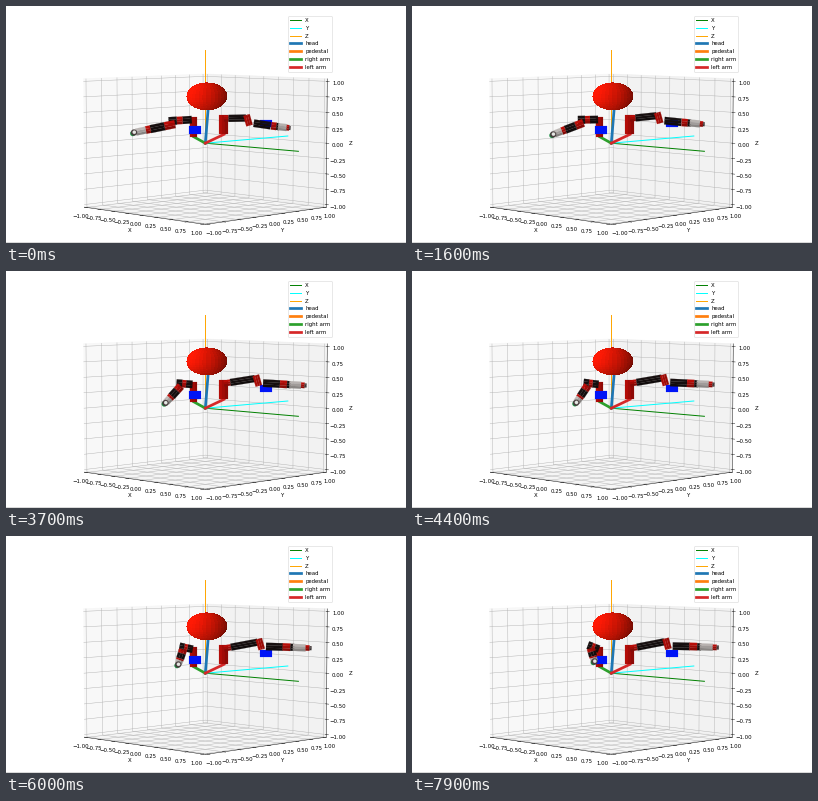
Animation of 400x237 px, one loop 8000 ms. Source, as a matplotlib script:

```python
import numpy as np
import matplotlib.pyplot as plt
from matplotlib.animation import FuncAnimation
from matplotlib.collections import PolyCollection
from matplotlib.patches import Rectangle

W, H, DPI = 400, 237, 39.2
FRAMES, INTERVAL = 80, 100

RED = (0.7, 0.05, 0.03)
BLACK = (0.09, 0.06, 0.06)
DARK = (0.28, 0.24, 0.24)
GREY = (0.7, 0.68, 0.67)
WHITE = (0.9, 0.9, 0.89)
GREEN = (0.1, 0.55, 0.25)
LIGHT = np.array([-0.6, -0.8])

fig = plt.figure(figsize=((W + 1e-7) / DPI, (H + 1e-7) / DPI), dpi=DPI,
                 facecolor="white")


def draw_head(ax):
    lon, lat = np.meshgrid(np.linspace(0, 2 * np.pi, 33),
                           np.linspace(-np.pi / 2, np.pi / 2, 19))
    nx, ny, nz = np.cos(lat) * np.cos(lon), np.cos(lat) * np.sin(lon), np.sin(lat)
    shade = 0.7 + 0.32 * (-0.4 * nx - 0.85 * ny + 0.3 * nz)
    rgb = np.clip(shade[..., None] * np.array([1, 0.1, 0.02]), 0, 1)
    ax.plot_surface(0.026 + 0.24 * nx, 0.24 * ny, 0.76 + 0.215 * nz,
                    facecolors=rgb, shade=False, rstride=1, cstride=1,
                    linewidth=0, antialiased=False)


def build_scene():
    """Static 3D axes: frame lines, torso links and the head."""
    side, left, top = 267, 62.2, 7.3
    ax = fig.add_axes([left / W, (H - top - side) / H, side / W, side / H],
                      projection="3d")
    ax.view_init(elev=5, azim=-45)
    lim, ticks = 25 / 24, np.linspace(-1, 1, 9)
    ax.set(xlim=(-lim, lim), ylim=(-lim, lim), zlim=(-lim, lim),
           xticks=ticks, yticks=ticks, zticks=ticks,
           xlabel="X", ylabel="Y", zlabel="Z")

    def ray(end, color, label, lw=5):
        ax.plot(*[(0, c) for c in end], color=color, label=label, lw=lw)

    for end, color, label in zip(1.5 * np.eye(3), ("green", "cyan", "orange"), "XYZ"):
        ray(end, color, label, lw=1.8)
    ray((0.06, 0, 0.686), "C0", "head")
    ax.plot([], [], [], color="C1", lw=5, label="pedestal")
    ray((0.064, -0.259, 0.129), "C2", "right arm")
    ray((0.064, 0.259, 0.129), "C3", "left arm")
    ax.legend(loc="upper right")
    draw_head(ax)


build_scene()

flat = fig.add_axes([0, 0, 1, 1], zorder=5)
flat.set(xlim=(0, W), ylim=(H, 0))
flat.axis("off")
flat.add_patch(Rectangle((0, 236), W, 1, color="#d9d9d9", lw=0))
body = flat.add_collection(PolyCollection([], linewidths=0.3), autolim=False)


def mix(a, b, u):
    return np.asarray(a) * (1 - u) + np.asarray(b) * u


class Shapes:
    def __init__(self):
        self.verts, self.colors = [], []

    def poly(self, pts, color):
        self.verts.append(np.asarray(pts, float))
        self.colors.append(color)

    def tube(self, a, b, width, color, strips=3):
        """A cylinder seen from the side, lit from the upper left."""
        a, b = np.asarray(a, float), np.asarray(b, float)
        d = b - a
        n = np.array([-d[1], d[0]]) / np.hypot(*d)
        edges = np.linspace(-1, 1, strips + 1)
        for lo, hi in zip(edges, edges[1:]):
            p, q = n * lo * width / 2, n * hi * width / 2
            shade = 0.9 + 0.25 * (lo + hi) / 2 * (n @ LIGHT)
            self.poly([a + p, b + p, b + q, a + q], np.multiply(color, shade))

    def chain(self, a, b, *parts):
        """Tubes along a-b; each part is (from, to, width, color)."""
        for u, v, width, color in parts:
            self.tube(mix(a, b, u), mix(a, b, v), width, color)

    def disc(self, c, r, color):
        ang = np.linspace(0, 2 * np.pi, 17)[:-1]
        self.poly(c + r * np.column_stack([np.cos(ang), np.sin(ang)]), color)

    def cube(self, x, y, w, h):
        self.poly([(x, y), (x + w, y), (x + w, y + h), (x, y + h)], (0, 0.08, 0.97))


def left_arm(s, u):
    """Reaches outwards and up, slowing down."""
    ease = 1 - (1 - u) ** 2
    shoulder = np.array([218, 112.5])
    elbow = mix((241, 112), (254, 105.5), ease)
    fore = elbow + (2, 4.5)
    wrist = mix((267, 120), (280, 110.5), ease)
    tip = mix((284, 122), (306, 111.5), ease)
    s.tube((217.5, 128.5), (217.5, 109.5), 8.5, RED)
    s.chain(shoulder, elbow, (0, 0.2, 6, RED), (0.2, 0.95, 7, BLACK))
    s.tube(elbow - (0.5, 3), fore + (0.5, 3), 6.5, RED)
    s.chain(fore, wrist, (0.2, 0.9, 7.5, BLACK))
    s.chain(wrist, tip, (-0.1, 0.2, 7.5, RED), (0.2, 0.35, 7, BLACK),
            (0.3, 0.8, 7, GREY), (0.8, 0.95, 5.5, RED), (0.95, 1.03, 4, DARK))


def right_arm(s, u):
    """Swings in across the body, dipping midway."""
    swing = np.sin(np.pi * u) ** 2
    shoulder = np.array([188, 113.5])
    elbow = mix((165, 115), (177, 109.5), u) + (1.5 * swing, 0)
    fore = elbow + (2, 3.5)
    tip = mix((128, 126.5), (182.5, 125.5), u) + np.array([6, 6]) * swing
    s.tube((187.5, 131), (187.5, 111), 7.5, RED)
    s.cube(183, 120.5, 12, 7.4)
    s.chain(shoulder, elbow, (0.1, 0.5, 7.5, BLACK), (0.5, 0.75, 7.5, RED),
            (0.75, 1.1, 8, BLACK))
    s.chain(fore, tip, (-0.05, 0.22, 8, RED), (0.22, 0.58, 8, BLACK),
            (0.58, 0.7, 7.5, RED), (0.7, 0.95, 7, GREY))
    s.disc(tip + (-1.2, 1), 2.6, GREEN)
    s.disc(tip, 3.1, DARK)
    s.disc(tip + (0.3, -0.3), 1.7, WHITE)


def update(i):
    u = i / (FRAMES - 1)
    s = Shapes()
    s.cube(253.7, 114.5, 12, 6.2)
    left_arm(s, u)
    right_arm(s, u)
    body.set_verts(s.verts)
    body.set_facecolor(np.clip(s.colors, 0, 1))
    body.set_edgecolor("face")
    return [body]


anim = FuncAnimation(fig, update, frames=FRAMES, interval=INTERVAL,
                     repeat=True, repeat_delay=0, blit=False)
plt.show()
```
